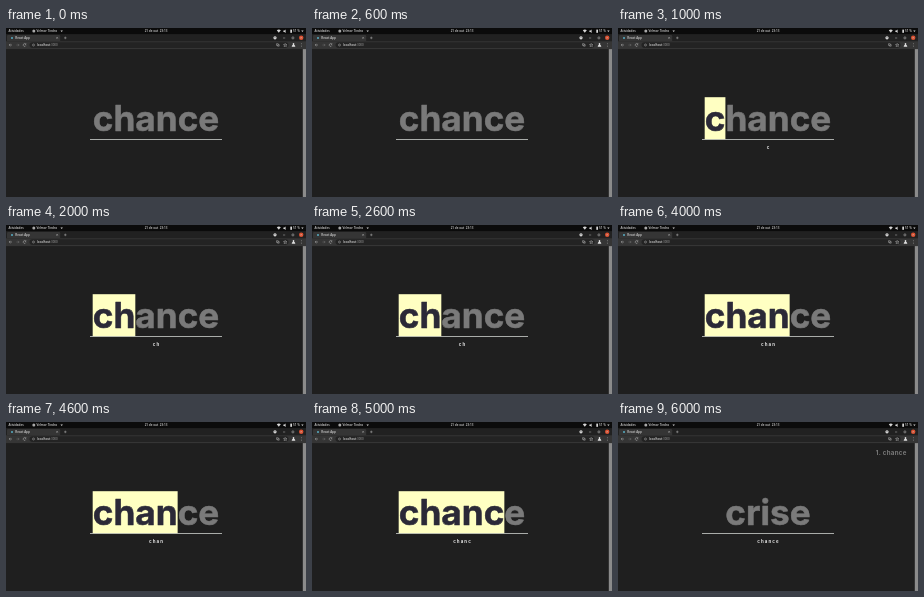
These frames come from a looping animation (300x169 px, 7000 ms). An HTML page:

```html
<!DOCTYPE html>
<html lang="pt">
<head>
<meta charset="utf-8">
<style>
html, body { margin: 0; width: 100%; height: 100%; overflow: hidden; background: #1f1f1f; }
svg { display: block; width: 100%; height: 100%; }
text { white-space: pre; }
.ui { font: 600 3px "Open Sans", sans-serif; fill: #d6d6d6; }
.page { font-family: Inter, sans-serif; font-weight: 700; }
.big { stroke-width: .5; stroke-linejoin: round; }
.icon { fill: none; stroke: #c4c4c4; stroke-width: .45; }
</style>
</head>
<body>
<svg viewBox="0 0 300 169">
  <rect width="300" height="169" fill="#1f1f1f"/>

  <!-- system bar -->
  <rect width="300" height="6.3" fill="#0b0b0b"/>
  <g class="ui">
    <text x="2.5" y="4.1">Atividades</text>
    <circle cx="27.8" cy="3.1" r="1.5" fill="#a9a9a9"/>
    <text x="30.5" y="4.1">Velmor Tindra</text>
    <path d="M54.5 2.6h2.4l-1.2 1.4z"/>
    <text x="150" y="4.1" text-anchor="middle">21 de out  23:13</text>
    <path d="M270.8 2.2q2-1.6 4 0l-2 2.6z"/>
    <path d="M277.4 2.5h1l1.2-1v3.4l-1.2-1h-1z"/>
    <rect x="284.3" y="1.6" width="1.7" height="3.2"/>
    <text x="287" y="4.1">51 %</text>
    <path d="M295.2 2.6h2.4l-1.2 1.4z"/>
  </g>

  <!-- tab strip -->
  <rect y="6.3" width="300" height="7" fill="#212121"/>
  <path d="M1 13.3V8.2q0-1.2 1.2-1.2H53q1.2 0 1.2 1.2v5.1z" fill="#353535"/>
  <circle cx="6" cy="10" r="1" fill="#57aec4"/>
  <text class="ui" x="9.3" y="11">React App</text>
  <path class="icon" d="M50.3 9.1l1.6 1.6m0-1.6l-1.6 1.6M58 9.9h2.6m-1.3-1.3v2.6M277 10h2.2M286 9h1.8v1.8H286z"/>
  <circle cx="269" cy="9.8" r="1.6" fill="#e4e4e4"/>
  <path d="M268.3 9.5h1.4l-.7.9z" fill="#212121"/>
  <circle cx="295.2" cy="9.8" r="2.2" fill="#dc5030"/>
  <path class="icon" d="M294.5 9.1l1.4 1.4m0-1.4l-1.4 1.4"/>

  <!-- toolbar -->
  <rect y="13.3" width="300" height="7.8" fill="#353535"/>
  <rect x="23.5" y="14.3" width="259" height="5.6" rx="2.8" fill="#232323"/>
  <path class="icon" d="M6 17H3.2m1.2-1.2L3.2 17l1.2 1.2"/>
  <path class="icon" stroke-opacity=".45" d="M10.4 17h2.8m-1.2-1.2l1.2 1.2-1.2 1.2"/>
  <path class="icon" d="M19.7 16.1a1.4 1.4 0 1 0 .2 1.4M19.9 15.3v1.1h-1.1"/>
  <circle class="icon" cx="27.5" cy="17" r="1"/>
  <text class="ui" x="31" y="18">localhost<tspan fill="#858585">:3000</tspan></text>
  <path class="icon" d="M270.5 15.7h1.7v1.7h-1.7zM272.2 16.6h1v1.6h-1.6v-.8"/>
  <path class="icon" d="M279.2 15.4l.5 1.1 1.2.1-.9.8.3 1.2-1.1-.6-1.1.6.3-1.2-.9-.8 1.2-.1z"/>
  <path d="M287.5 15a.9 1 0 0 1 .5 1.8q1.3.4 1.3 2h-3.6q0-1.6 1.3-2a.9 1 0 0 1 .5-1.8z" fill="#e0e0e0"/>
  <g fill="#c4c4c4">
    <circle cx="295.3" cy="15.7" r=".35"/>
    <circle cx="295.3" cy="17" r=".35"/>
    <circle cx="295.3" cy="18.3" r=".35"/>
  </g>

  <!-- scrollbar -->
  <rect x="296.8" y="21.1" width="3.2" height="147.9" fill="#8b8b8b"/>

  <!-- typing game -->
  <g class="page">
    <rect x="84" y="111" width="132" height=".9" fill="#b9bdb9"/>
    <rect id="mark" y="69.2" height="42" fill="#ffffc2"/>
    <text id="word" class="big" x="150" y="103" font-size="35.2" text-anchor="middle" fill="#7a7a7a" stroke="#7a7a7a"><tspan id="done" fill="#2b2937" stroke="#2b2937"></tspan><tspan id="rest"></tspan></text>
    <text id="typed" x="150.5" y="120.8" font-size="4.4" letter-spacing="1.1" text-anchor="middle" fill="#e8e8e8"></text>
    <text id="score" x="288.8" y="32.5" font-size="6.2" letter-spacing=".3" text-anchor="end" fill="#7a7a7a"></text>
  </g>
</svg>
<script>
const STEP = 1000, TARGET = "chance", NEXT = "crise";
const [mark, word, done, rest, typed, score] =
  ["mark", "word", "done", "rest", "typed", "score"].map(id => document.getElementById(id));
const start = performance.now();
let shown = -1;

function draw(count) {
  const won = count === TARGET.length;
  const hit = won ? 0 : count;
  const label = won ? NEXT : TARGET;
  done.textContent = label.slice(0, hit);
  rest.textContent = label.slice(hit);
  typed.textContent = TARGET.slice(0, count);
  score.textContent = won ? "1. " + TARGET : "";
  mark.setAttribute("x", 150 - word.getComputedTextLength() / 2);
  mark.setAttribute("width", hit ? word.getSubStringLength(0, hit) : 0);
}

function tick(now) {
  const time = Math.max(0, now - start);
  const count = Math.floor(time / STEP) % (TARGET.length + 1);
  if (count !== shown) draw(shown = count);
  requestAnimationFrame(tick);
}

tick(start);
</script>
</body>
</html>
```
